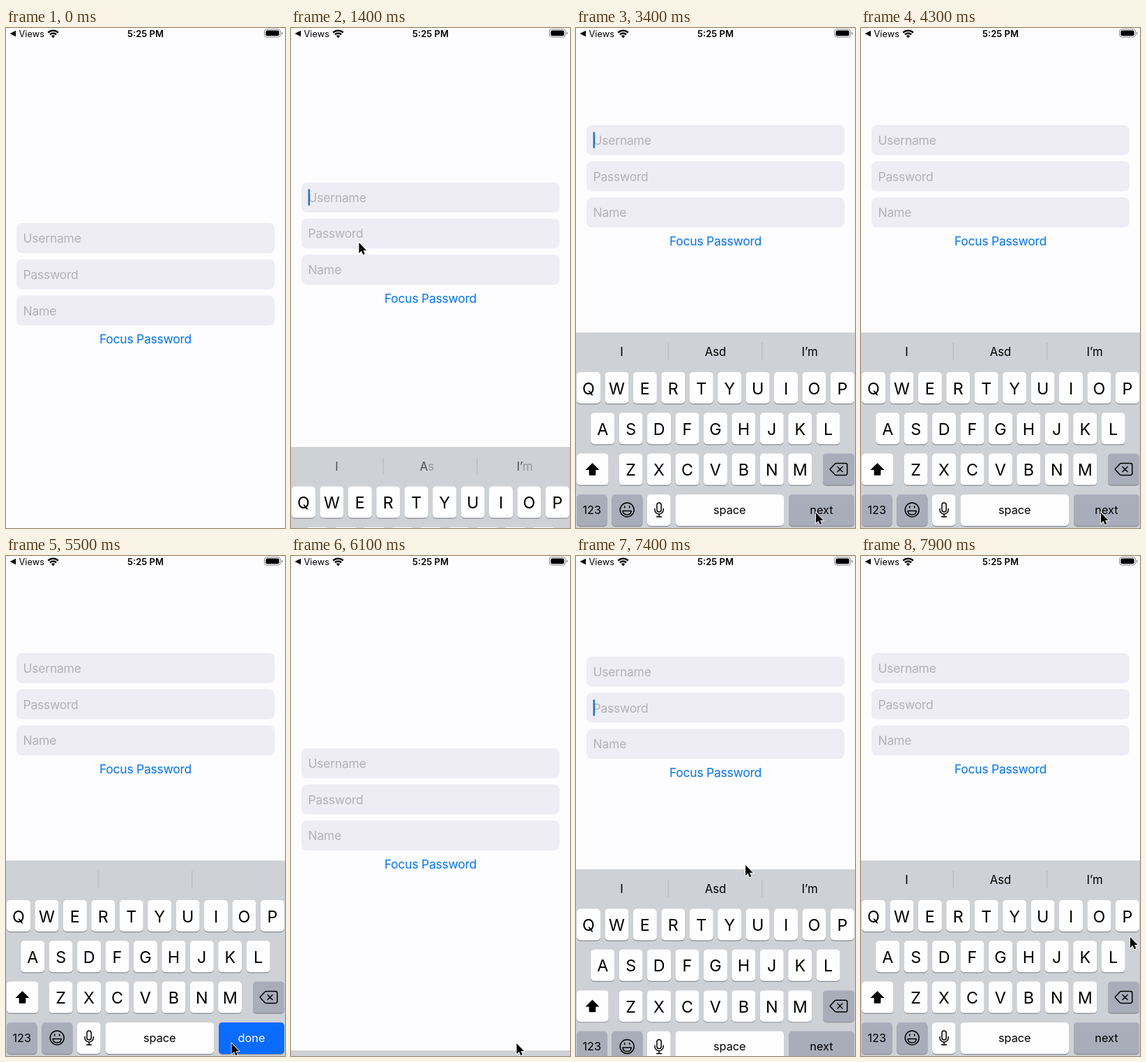
These frames come from a looping animation (400x715 px, 8000 ms). An HTML page:

```html
<!DOCTYPE html>
<html lang="en">
<head>
<meta charset="utf-8">
<title>Field focus</title>
<style>
  html, body { margin: 0; width: 100%; height: 100%; overflow: hidden; background: #fdfcff; }
  svg { display: block; width: 400px; height: 715px; font-family: Inter, sans-serif; }
  .body { font-size: 17.5px; letter-spacing: -.25px; }
  .hint { fill: #b2b2b7; }
  .mid { text-anchor: middle; }
  .letter { font-size: 23.3px; }
  .word { font-size: 16.3px; }
  .line { fill: none; stroke: #000; stroke-width: 1.5; stroke-linecap: round; stroke-linejoin: round; }
</style>
</head>
<body>
<svg viewBox="0 0 400 715">
  <path d="M5.5 8 14 3.8V12.2Z"/>
  <text x="18.5" y="12.5" font-size="12.8">Views</text>
  <g fill="none" stroke="#000" stroke-width="2.3">
    <path d="M60.4 6.6a10.2 10.2 0 0 1 14.4 0"/>
    <path d="M63.1 9.4a6.3 6.3 0 0 1 9 0"/>
  </g>
  <path d="M67.6 14.2 65 11.5a3.7 3.7 0 0 1 5.2 0Z"/>
  <text class="mid" x="200" y="12.5" font-size="13" font-weight="600">5:25 PM</text>
  <rect x="370.5" y="1.8" width="23" height="11.2" rx="3.4" fill="none" stroke="#858588"/>
  <rect x="372.4" y="3.6" width="19.2" height="7.6" rx="1.8"/>
  <path d="M395 5.4q1.6.6 1.6 2t-1.6 2Z" fill="#858588"/>

  <g id="form">
    <g id="fields"></g>
    <text id="button" class="body mid" x="200" y="451.3" fill="#0575ea">Focus Password</text>
    <rect id="caret" x="24.6" width="2.4" height="23.6" rx="1" fill="#1771cb"/>
  </g>

  <g id="keyboard">
    <rect y="435.5" width="400" height="290" fill="#ced1d6"/>
    <path d="M132.2 450V475.500M266.800 450V475.500" stroke="#b4b7bc"/>
    <g id="suggestions" class="mid" font-size="16.8">
      <text x="65.500" y="469"><tspan>I</tspan></text>
      <text x="200" y="469"><tspan>A</tspan><tspan>s</tspan><tspan>d</tspan></text>
      <text x="335" y="469"><tspan>I’</tspan><tspan>m</tspan></text>
    </g>
    <g id="keys"></g>
    <path d="M23.500 622 33.500 632H28.300V638.500q0 1.200-1.200 1.200h-7.200q-1.200 0-1.200-1.200V632H13.500Z"/>
    <path class="line" d="M364 631 371 623.500q.9-.9 2-.9h13.500q2.300 0 2.300 2.300v12.200q0 2.300-2.300 2.300H373q-1.100 0-2-.9ZM375 627.500l7 7m0-7-7 7"/>
    <g class="line">
      <circle cx="73.200" cy="689" r="10"/>
      <path d="M67 690.500h12.400q-.6 5.500-6.200 5.500t-6.200-5.500ZM69.700 684v2M76.700 684v2"/>
      <rect x="116" y="679" width="6.200" height="13" rx="3.100"/>
      <path d="M113 687.500v1.500a6.100 6.100 0 0 0 12.200 0v-1.500M119.100 695.200v3.600M115.600 699h7"/>
    </g>
  </g>

  <path id="cursor" d="M0 0V15L3.500 11.800 5.900 17.200 8.300 16.100 6 10.900H10.600Z"
        stroke="#fff" stroke-width="1.6" paint-order="stroke"/>
</svg>
<script>
const $ = id => document.getElementById(id);
const LOOP = 8000;

// Fields and keys
$('fields').innerHTML = ['Username', 'Password', 'Name'].map((label, i) => {
  const y = 279 + 51.75 * i;
  return `<rect x="15" y="${y}" width="370" height="43" rx="8" fill="#eeedf5"/>
    <text class="body hint" x="24.600" y="${y + 28}">${label}</text>`;
}).join('');

const WHITE = '#fefdff', GREY = '#a9adba', BLUE = '#0a6cff';

function key(x, y, width, label = '', fill = WHITE, id = '') {
  const isLetter = label.length === 1;
  return `<g id="${id}">
    <rect x="${x}" y="${y + 1.2}" width="${width}" height="45" rx="5" fill="#898b90"/>
    <rect x="${x}" y="${y}" width="${width}" height="45" rx="5" fill="${fill}"/>
    <text class="mid ${isLetter ? 'letter' : 'word'}" x="${x + width / 2}" y="${y + (isLetter ? 31.500 : 27.800)}">${label}</text>
  </g>`;
}

const rows = [['QWERTYUIOP', 1, 492], ['ASDFGHJKL', 21.2, 550.3], ['ZXCVBNM', 61.6, 608.6]];
$('keys').innerHTML = rows.map(([letters, x, y]) =>
  [...letters].map((c, i) => key(x + 40.43 * i, y, 34, c)).join('')).join('')
  + key(1, 608.6, 45.5) + key(354, 608.6, 45, '', GREY)
  + key(1, 667, 43.6, '123', GREY) + key(51.4, 667, 44, '', GREY) + key(102, 667, 33.6)
  + key(142.5, 667, 155.5, 'space') + key(305, 667, 94, 'next', GREY, 'return');

const returnFill = $('return').children[1], returnLabel = $('return').children[2];

// Timeline
const SHOW = 1322, HIDE = 5803, SHOW_AGAIN = 7130;
const focusSpans = [   // from, to, field, start of the blink cycle
  [1322, 3700, 0, 1200],
  [3700, 4900, 1, 3700],
  [4900, 5790, 2, 4850],
  [7115, 8000, 1, 7100],
];
const presses = [[3600, 3780], [4780, 4950], [5680, 5800]];
const cursorPath = [
  [90, 145, 639], [300, 195, 593], [450, 195, 593], [680, 231, 530], [1100, 97.5, 307],
  [2650, 97.5, 307], [3350, 344, 693], [4550, 344, 693], [4780, 323.500, 697],
  [6250, 323.500, 697], [6980, 243, 442], [7400, 243, 442], [7900, 386, 545],
];

const clamp = v => Math.min(1, Math.max(0, v));
const smooth = v => v * v * (3 - 2 * v);
const within = (t, [from, to]) => t >= from && t < to;

// Critically damped spring from 0 to 1
function spring(ms) {
  const x = Math.max(0, ms) * .018;
  return 1 - (1 + x) * Math.exp(-x);
}

function raised(t, showAgain) {
  if (t < HIDE) return spring(t - SHOW);
  return t < 7000 ? 1 - spring(t - HIDE) : spring(t - showAgain);
}

function caretOpacity(ms) {
  const phase = ms % 1000;
  return phase < 700 ? 1 - clamp((phase - 500) / 100) : clamp((phase - 880) / 100);
}

function cursorAt(t) {
  const next = cursorPath.findIndex(p => p[0] > t);
  if (next < 0) return cursorPath.at(-1).slice(1);
  const [t0, x0, y0] = cursorPath[next - 1], [t1, x1, y1] = cursorPath[next];
  const k = smooth((t - t0) / (t1 - t0));
  return [x0 + (x1 - x0) * k, y0 + (y1 - y0) * k];
}

function draw(t) {
  $('form').setAttribute('transform', `translate(0 ${-140.2 * raised(t, SHOW_AGAIN - 15)})`);
  $('keyboard').setAttribute('transform', `translate(0 ${280 * (1 - raised(t, SHOW_AGAIN))})`);
  $('button').setAttribute('opacity', within(t, [7100, 7370]) ? .25 + .75 * (t - 7100) / 270 : 1);

  const focus = focusSpans.find(span => within(t, span));
  $('caret').setAttribute('opacity', focus ? caretOpacity(t - focus[3]) : 0);
  if (focus) $('caret').setAttribute('y', 288.6 + 51.75 * focus[2]);

  // Suggestions appear letter by letter and are empty for the last field
  const done = within(t, [4900, 7000]);
  const age = t - (t < 7000 ? SHOW : SHOW_AGAIN);
  for (const text of $('suggestions').children) {
    [...text.children].forEach((part, i) => {
      const shown = i ? (age - 46 - 22 * i) / 40 : age / 125;
      part.setAttribute('fill-opacity', done ? 0 : clamp(shown));
    });
  }

  const pressed = presses.some(span => within(t, span));
  returnFill.setAttribute('fill', pressed ? WHITE : done ? BLUE : GREY);
  returnLabel.setAttribute('fill', done && !pressed ? '#fff' : '#000');
  returnLabel.textContent = done ? 'done' : 'next';

  const visible = t >= cursorPath[0][0];
  $('cursor').setAttribute('visibility', visible ? 'visible' : 'hidden');
  if (visible) $('cursor').setAttribute('transform', `translate(${cursorAt(t)})`);
}

const start = performance.now();
function tick() {
  draw((performance.now() - start) % LOOP);
  requestAnimationFrame(tick);
}
tick();
</script>
</body>
</html>
```
